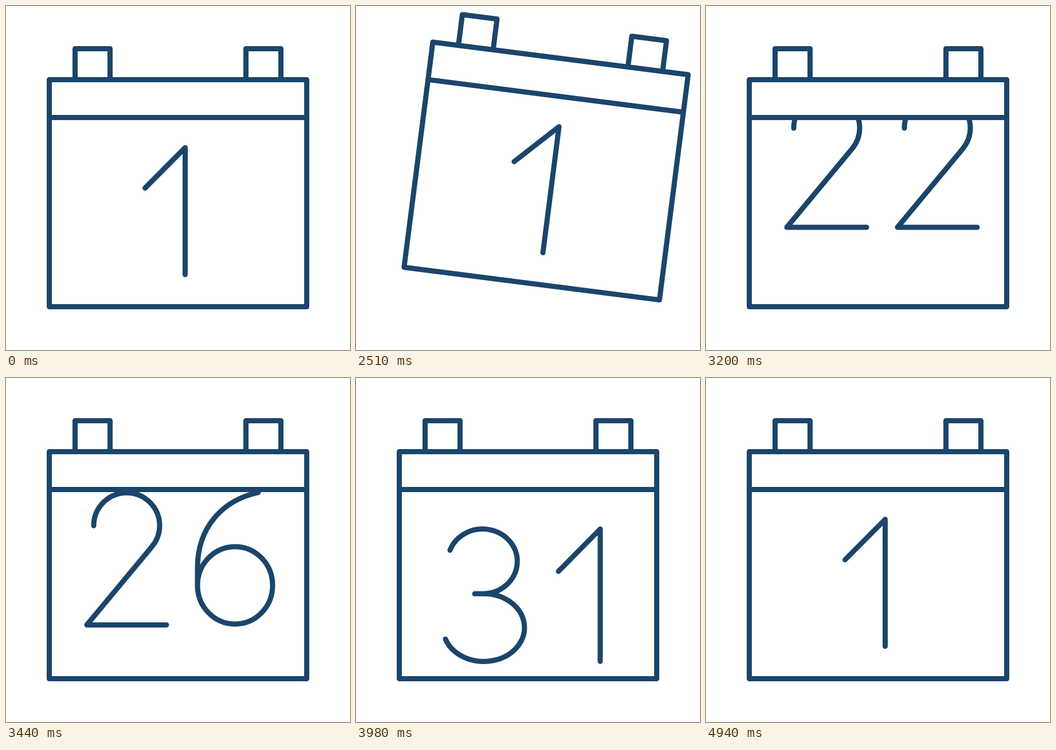
An HTML page with a canvas that plays this animation: 600x600 px, repeating every 4970 ms.

```html
<!DOCTYPE html>
<html>
<head>
<meta charset="utf-8">
<style>
html, body { margin: 0; width: 100%; height: 100%; overflow: hidden; background: #fff; }
canvas { display: block; }
</style>
</head>
<body>
<canvas width="600" height="600"></canvas>
<script>
const ctx = document.querySelector('canvas').getContext('2d');
const LOOP = 4970, STEP = 30;
const LIFT = 2000, PEAK = 2540, LAND = 2900, REST = 3080;
const ROLL = 2592, DROP = 4205;
const PITCH = 400;

const frame = new Path2D(
  'M75.5 128.5H524.5V524.5H75.5ZM75.5 194.5H524.5' +
  'M120.5 128.5V74.5H181.5V128.5M418.5 128.5V74.5H479.5V128.5');
const firstDay = new Path2D('M242.5 317.5L312.5 247V468.5');

// Digits stand on y = 0 and are centred on x = 0
const digits = [
  'M0-231A74 115.5 0 1 1 0 0A74 115.5 0 1 1 0-231Z',
  'M-50-157L23-231V0',
  'M-57-173A57.5 57.5 0 0 1 58-173A57.5 57.5 0 0 1 44-136L-69 0H70',
  'M-58-194A60.5 56.5 0 1 1 0-118H-15H0A71 59 0 1 1-66-39',
  'M28 0V-231L-74-60H74',
  'M55-231H-42L-52-133A74 72 0 1 1-66-40',
  'M37-231C-27-217-69-169-69-99V-69A65.5 67.5 0 1 1 62-69A65.5 67.5 0 1 1-69-69',
  'M-65-231H68L-25 0',
  'M0-231A56 57 0 1 1 0-117A56 57 0 1 1 0-231ZM0-117A72 58.5 0 1 1 0 0A72 58.5 0 1 1 0-117Z',
  'M69-162A65.5 67.5 0 1 1-62-162A65.5 67.5 0 1 1 69-162V-132C69-62 27-14-37 0'
].map(d => new Path2D(d));

const smooth = u => u * u * (3 - 2 * u);

function draw(path, x, y) {
  ctx.save();
  ctx.translate(x, y);
  ctx.stroke(path);
  ctx.restore();
}

function drawDay(day, y) {
  if (day === 1) return draw(firstDay, 0, y - 468);
  if (day < 10) return draw(digits[day], 300, y);
  const tens = Math.floor(day / 10);
  draw(digits[tens], tens === 3 ? 222 : day === 29 ? 215 : 210, y);
  draw(digits[day % 10], 403, y);
}

// Tilt in degrees and extra sink in pixels
function pose(t) {
  if (t < LIFT || t >= REST) return [0, 0];
  if (t <= PEAK) {
    const n = (t - LIFT) / STEP;
    return [0.1525 * n + 0.0162 * n * n, 0];
  }
  if (t <= LAND) {
    const u = Math.sin((t - PEAK) / (LAND - PEAK) * Math.PI / 2);
    return [8 - 8.8 * u, 11 * u ** 3];
  }
  const left = 1 - smooth((t - LAND) / (REST - LAND));
  return [-0.8 * left, 11 * left];
}

function drawDays(t) {
  if (t < ROLL) return drawDay(1, 468);
  if (t >= DROP) {
    const s = (t - DROP) / 1000;
    return drawDay(1, 468 - 275 * Math.exp(-7.9 * s) * Math.cos(7.2 * s));
  }
  // The rolling strip of days slows down exponentially
  const rolled = 5273 * (1 - Math.exp((3200 - t) / 642));
  for (let day = 1; day <= 31; day++) {
    const y = 386 + PITCH * (22 - day) + rolled;
    if (y > 190 && y < 760) drawDay(day, y);
  }
}

function render(t) {
  const [tilt, sink] = pose(t);
  ctx.clearRect(0, 0, 600, 600);
  ctx.lineWidth = 9;
  ctx.lineCap = ctx.lineJoin = 'round';
  ctx.strokeStyle = '#1b456b';
  ctx.save();
  ctx.translate(620.5, 556 + sink);
  ctx.rotate(tilt * Math.PI / 180);
  ctx.translate(-620.5, -556);
  ctx.stroke(frame);
  ctx.beginPath();
  ctx.rect(80, 199, 440, 321);
  ctx.clip();
  drawDays(t);
  ctx.restore();
}

const start = performance.now();
function tick() {
  const t = (performance.now() - start) % LOOP;
  // Motion advances in fixed steps; the opening pose holds until 2030 ms
  render(t < 2030 ? 0 : 2030 + Math.floor((t - 2030) / STEP) * STEP);
  requestAnimationFrame(tick);
}
tick();
</script>
</body>
</html>
```
